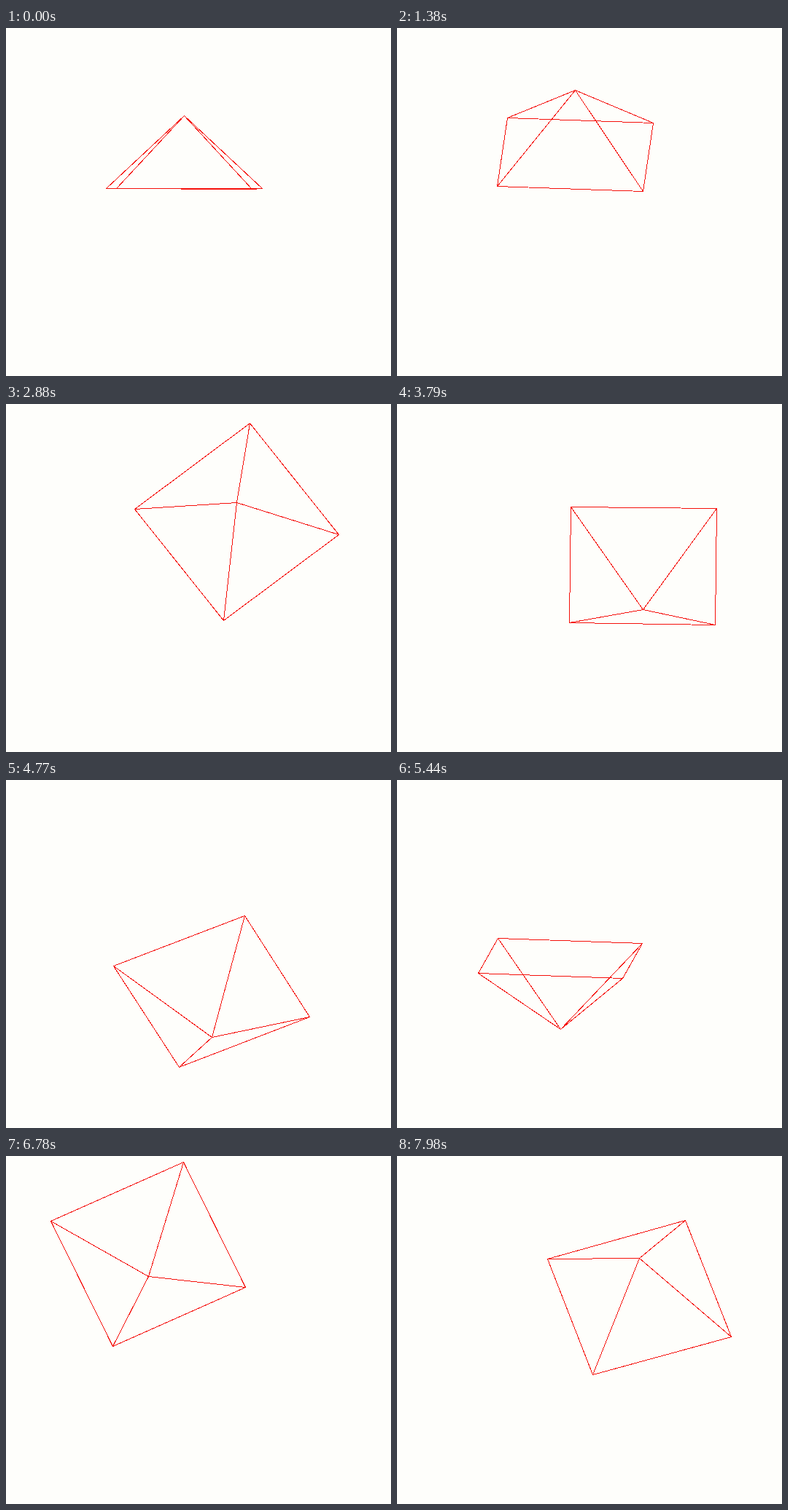
Write an HTML page that moves like this. It is 528 px wide and 478 px high and loops after 8000 ms.

```html
<!DOCTYPE html>
<html lang="en">
<head>
<meta charset="utf-8">
<title>Turning pyramid</title>
<style>
  html, body { margin: 0; width: 100%; height: 100%; overflow: hidden; background: #fefefb; }
  svg { display: block; width: 528px; height: 478px; }
  path { fill: none; stroke: #f5100a; stroke-width: 1; shape-rendering: crispEdges; }
</style>
</head>
<body>
<svg viewBox="0 0 528 478"><path id="wire"/></svg>
<script>
const LOOP = 8000;
const SIDE = 200, HEIGHT = 100;
const PIVOT = { x: 237, y: 220.5 };
const wire = document.getElementById('wire');

// Turning points of the hand-steered rotation, in ms and degrees
const pose = (time, spin, tilt) => ({ time, spin, tilt });
const poses = [
  pose(0, -86, 0.1), pose(830, -66, 47), pose(1380, -86, 28.2), pose(1780, -116, 26),
  pose(2880, -37.8, 74.6), pose(3300, -9, 97), pose(4100, 10, 140), pose(4770, 63.5, 128.9),
  pose(6140, 123, 213.5), pose(6780, 115.2, 252.1), pose(7980, 18.4, 302.6)
];
const last = poses.length - 1;

function slope(i, key) {
  const a = poses[Math.max(i - 1, 0)], b = poses[Math.min(i + 1, last)];
  return (b[key] - a[key]) / (b.time - a.time);
}

// Smooth curve through the poses, in radians
function angle(t, key) {
  let i = 0;
  while (i < last - 1 && t >= poses[i + 1].time) i++;
  const a = poses[i], b = poses[i + 1], span = b.time - a.time;
  const u = (t - a.time) / span, v = 1 - u;
  const deg = v * v * (1 + 2 * u) * a[key] + u * u * (3 - 2 * u) * b[key]
    + span * u * v * (v * slope(i, key) - u * slope(i + 1, key));
  return deg * Math.PI / 180;
}

function draw(t) {
  const spin = angle(t, 'spin'), tilt = angle(t, 'tilt');
  const cs = Math.cos(spin), ss = Math.sin(spin);
  const ct = Math.cos(tilt), st = Math.sin(tilt);

  // Orthographic view, snapped to pixel centres
  const project = (x, h, z) => {
    const px = PIVOT.x + x * cs - z * ss;
    const py = PIVOT.y + (x * ss + z * cs) * st - h * ct;
    return `${Math.round(px) + 0.5} ${Math.round(py) + 0.5}`;
  };

  // The base hinges on the middle of one side
  const half = SIDE / 2;
  const a = project(0, 0, -half), b = project(SIDE, 0, -half);
  const c = project(SIDE, 0, half), d = project(0, 0, half);
  const top = project(half, HEIGHT, 0);
  wire.setAttribute('d', `M${a}L${b}L${c}L${d}ZM${a}L${top}L${c}M${b}L${top}L${d}`);
}

const start = performance.now();
function tick() {
  draw((performance.now() - start) % LOOP);
  requestAnimationFrame(tick);
}
tick();
</script>
</body>
</html>
```
